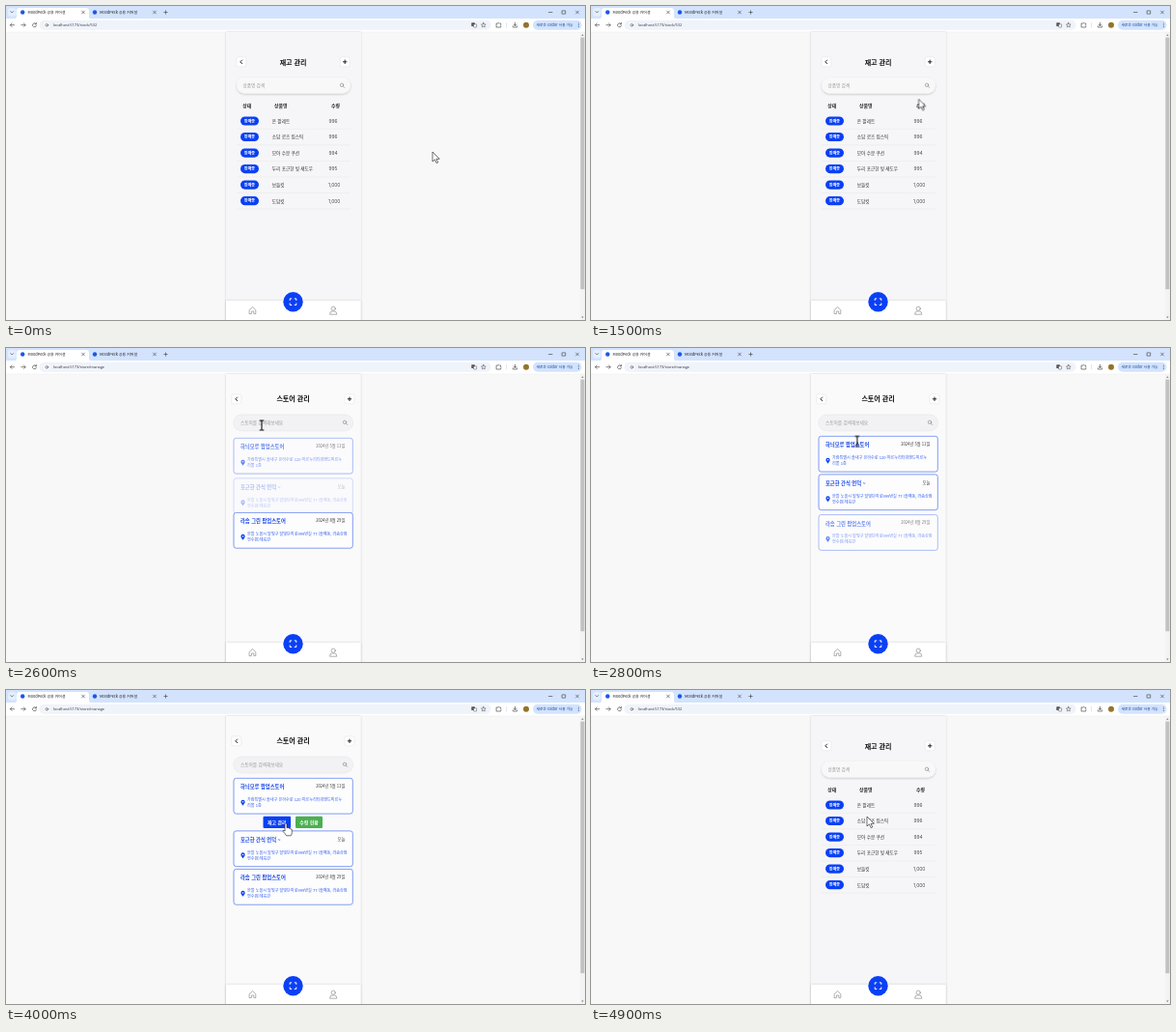
Animation of 600x325 px, one loop 5 s. Source, as an HTML page:

```html
<!DOCTYPE html>
<html lang="ko">
<head>
<meta charset="utf-8">
<title>재고 관리</title>
<style>
html, body { margin: 0; width: 100%; height: 100%; overflow: hidden; background: #f8f8f8; }
svg { display: block; width: 600px; height: 325px; }
text { font-family: 'Noto Sans CJK KR', 'Noto Sans CJK', 'Noto Sans CJK JP', sans-serif; font-size: 4.65px; fill: #333; }
.latin { font-family: 'Open Sans', 'Noto Sans', sans-serif; font-size: 3.9px; }
.tab { font-size: 3.9px; fill: #1f1f1f; }
.title { font-size: 7px; font-weight: 700; fill: #111; text-anchor: middle; }
.head text { font-size: 4.9px; font-weight: 700; fill: #222; }
.hint { fill: #999; }
.num { font-family: Inter, 'DejaVu Sans', sans-serif; font-size: 4.8px; fill: #444; }
.badge { font-size: 4px; font-weight: 700; fill: #fff; text-anchor: middle; }
.btn { font-size: 4.9px; font-weight: 700; fill: #fff; text-anchor: middle; }
.name { font-size: 5.3px; font-weight: 700; fill: #1746e6; }
.date { font-size: 4.2px; text-anchor: end; }
.addr { font-size: 4.1px; fill: #2f5cf0; }
.line { fill: none; stroke: #444; stroke-width: .65; stroke-linecap: round; stroke-linejoin: round; }
.soft { stroke: #888; }
.rule { stroke: #e6e6e8; stroke-width: .5; }

.stock, .store, .shift, .tools, .cursor, .arrow, .beam, .hand, .card { animation: 5s linear infinite; }
.stock { animation-name: stock; animation-timing-function: step-end; }
.store { animation-name: store; animation-timing-function: step-end; }
.card { animation-name: rise; }
.second { animation-delay: .1s; }
.third { animation-delay: .21s; }
.shift { animation-name: shift; animation-timing-function: steps(2); }
.tools { animation-name: tools; animation-timing-function: steps(2); }
.cursor { animation-name: move; }
.arrow { animation-name: arrow; animation-timing-function: step-end; }
.beam { animation-name: beam; animation-timing-function: step-end; }
.hand { animation-name: hand; animation-timing-function: step-end; }

@keyframes stock { 0%, 88% { visibility: visible; } 48% { visibility: hidden; } }
@keyframes store { 0%, 88% { visibility: hidden; } 48% { visibility: visible; } }
@keyframes rise {
  0%, 47.99% { opacity: 1; transform: translateY(0); }
  48% { opacity: 0; transform: translateY(6px); }
  54%, 100% { opacity: 1; transform: translateY(0); }
}
@keyframes shift { 0%, 58% { transform: translateY(0); } 62%, 100% { transform: translateY(15px); } }
@keyframes tools { 0%, 58% { opacity: 0; } 62%, 100% { opacity: 1; } }
@keyframes move {
  0% { transform: translate(442px, 151px); animation-timing-function: steps(8); }
  16% { transform: translate(426px, 132px); animation-timing-function: steps(4); }
  24% { transform: translate(396px, 118px); animation-timing-function: steps(5); }
  34% { transform: translate(302px, 82px); animation-timing-function: steps(4); }
  42% { transform: translate(252px, 63.5px); animation-timing-function: steps(2); }
  46% { transform: translate(244px, 58px); }
  48% { transform: translate(244px, 58px); animation-timing-function: steps(2); }
  52% { transform: translate(265px, 80px); animation-timing-function: steps(5); }
  62% { transform: translate(292px, 121px); animation-timing-function: steps(5); }
  72%, 88% { transform: translate(290px, 138px); animation-timing-function: steps(5); }
  98%, 100% { transform: translate(286px, 131px); }
}
@keyframes arrow { 0%, 48%, 88% { visibility: visible; } 46%, 52% { visibility: hidden; } }
@keyframes beam { 0%, 68% { visibility: hidden; } 52% { visibility: visible; } }
@keyframes hand { 0%, 48%, 88% { visibility: hidden; } 46%, 68% { visibility: visible; } }
</style>
</head>
<body>
<svg viewBox="0 0 600 325">
  <defs>
    <filter id="shade" x="-10%" y="-30%" width="120%" height="170%">
      <feDropShadow dx="0" dy="1" stdDeviation=".9" flood-color="#000" flood-opacity=".2"/>
    </filter>
    <filter id="edge" x="-5%" y="-5%" width="110%" height="110%">
      <feDropShadow dx="0" dy="0" stdDeviation="1" flood-color="#000" flood-opacity=".18"/>
    </filter>
    <g id="back">
      <rect x="-5" y="-5" width="10" height="10" rx="2" fill="#fff" stroke="#dedee2" stroke-width=".5"/>
      <path class="line" d="M.8-1.8L-1 0L.8 1.8" style="stroke:#111;stroke-width:.9"/>
    </g>
    <g id="add">
      <rect x="-5" y="-5" width="10" height="10" rx="2" fill="#fff" stroke="#dedee2" stroke-width=".5"/>
      <path class="line" d="M-1.8 0H1.8M0-1.8V1.8" style="stroke:#111;stroke-width:.9"/>
    </g>
    <g id="lens"><circle class="line soft" r="1.7"/><path class="line soft" d="M1.3 1.3L2.8 2.8"/></g>
    <g id="row">
      <rect x="243" y="-4.6" width="19" height="9.2" rx="4.6" fill="#0a40f5"/>
      <text class="badge" x="252.5" y="1.5">판매중</text>
      <path class="rule" d="M239 8.3H357"/>
    </g>
    <g id="frame">
      <rect x="236" y="0" width="123.3" height="36.8" rx="2.5" fill="#fdfdfe" stroke="#3f68ec" stroke-width=".65"/>
      <path d="M245.5 28.4C244.4 26.8 243.4 25.7 243.4 24.5A2.1 2.1 0 0 1 247.6 24.5C247.6 25.7 246.6 26.8 245.5 28.4Z" fill="#0a40f5"/>
      <circle cx="245.5" cy="24.5" r=".75" fill="#fff"/>
    </g>
    <path id="close" class="line" d="M-1.4-1.4L1.4 1.4M1.4-1.4L-1.4 1.4"/>
  </defs>

  <!-- browser -->
  <rect width="600" height="325" fill="#f8f8f8"/>
  <rect width="600" height="14" fill="#d3e3fd"/>
  <rect x="2" y="2" width="8.5" height="8.5" rx="2.5" fill="#e4eefe"/>
  <path class="line" d="M4.8 5.6L6.2 7L7.6 5.6"/>
  <path d="M8 13.5Q11 13.5 11 10.5V5Q11 2 14 2H83Q86 2 86 5V10.5Q86 13.5 89 13.5Z" fill="#fff"/>
  <circle cx="17.2" cy="6.5" r="2.2" fill="#1b57e8"/>
  <text class="tab" x="22.5" y="8">MoodPeck 공용 커머셜</text>
  <use href="#close" x="80" y="6.5"/>
  <circle cx="92" cy="6.5" r="2.2" fill="#1b57e8"/>
  <text class="tab" x="97" y="8">MoodPeck 공용 커머셜</text>
  <use href="#close" x="154" y="6.5"/>
  <path class="line" d="M163.8 6.5H167.2M165.5 4.8V8.2M562.5 6.5H566M576.5 4.9H579.7V8.1H576.5Z"/>
  <use href="#close" x="592" y="6.5"/>
  <rect y="13" width="600" height="14" fill="#fff"/>
  <path class="line" d="M8.6 19.7H4.4M6.1 18L4.4 19.7L6.1 21.4M15.9 19.7H20.1M18.4 18L20.1 19.7L18.4 21.4M31 18.4A2 2 0 1 0 31.5 20.2M31.4 17.4V18.8H30"/>
  <rect x="34.5" y="14.8" width="468" height="10" rx="5" fill="#eff3fa"/>
  <circle cx="42.3" cy="19.8" r="2.9" fill="#fff"/>
  <circle class="line" cx="42.3" cy="19.8" r="1.5" style="stroke-width:.5"/>
  <path class="line" d="M42.3 19.6V20.5" style="stroke-width:.5"/>
  <text class="latin stock" x="49" y="21.2">localhost:5173/stock/532</text>
  <text class="latin store" x="49" y="21.2">localhost:5173/store/manage</text>
  <rect x="482.3" y="17.2" width="3.6" height="3.8" rx=".5" fill="#555"/>
  <rect class="line" x="484.6" y="18.8" width="3" height="3.2" rx=".4" style="fill:#fff;stroke-width:.5"/>
  <path class="line" style="stroke-width:.5" d="M494.8 17.3L495.5 18.9L497.2 19.1L495.9 20.2L496.3 21.9L494.8 21L493.3 21.9L493.7 20.2L492.4 19.1L494.1 18.9Z"/>
  <path class="line" d="M508.5 18H510A.8 .8 0 0 1 511.4 18H512.7V19.4A.8 .8 0 0 1 512.7 20.8V22H508.5Z"/>
  <path d="M518.5 17V22.5" stroke="#c7d8f5" stroke-width=".6"/>
  <path class="line" d="M527.5 17.2V20.4M526.1 19.1L527.5 20.5L528.9 19.1M525.4 20.8V22H529.6V20.8"/>
  <circle cx="539" cy="19.7" r="3" fill="#94732b"/>
  <rect x="546" y="14.8" width="50.5" height="10" rx="5" fill="#d3e3fd"/>
  <text x="549.5" y="21.2" style="font-size:3.75px;fill:#0b3f91">새로운 Glidor 사용 가능</text>
  <g fill="#24508f"><circle cx="593.3" cy="18" r=".5"/><circle cx="593.3" cy="19.8" r=".5"/><circle cx="593.3" cy="21.6" r=".5"/></g>
  <path d="M0 27H600" stroke="#e3e5e8" stroke-width=".4"/>

  <!-- app column -->
  <rect x="228" y="27" width="139.5" height="300" fill="#fafafb" filter="url(#edge)"/>
  <rect y="13" x="220" width="160" height="1" fill="#fff" opacity="0"/>

  <g class="stock">
    <rect x="228" y="27.2" width="139.5" height="298" fill="#f6f6f8"/>
    <use href="#back" x="243.8" y="57.8"/>
    <use href="#add" x="351.2" y="57.8"/>
    <text class="title" x="297.5" y="60.5">재고 관리</text>
    <rect x="239" y="74" width="118" height="16.5" rx="8.2" fill="#f8f8f9" filter="url(#shade)"/>
    <text class="hint" x="245.5" y="83.8">상품명 검색</text>
    <use href="#lens" x="348" y="81.8"/>
    <g class="head">
      <text x="245.3" y="105.2">상태</text>
      <text x="278" y="105.2">상품명</text>
      <text x="337" y="105.2">수량</text>
    </g>
    <g transform="translate(0 119)"><use href="#row"/><text x="275.8" y="1.8">온 팔레트</text><text class="num" x="334.5" y="1.8">996</text></g>
    <g transform="translate(0 135.5)"><use href="#row"/><text x="275.8" y="1.8">소담 로즈 립스틱</text><text class="num" x="334.5" y="1.8">996</text></g>
    <g transform="translate(0 152.1)"><use href="#row"/><text x="275.8" y="1.8">모아 수분 쿠션</text><text class="num" x="334.5" y="1.8">994</text></g>
    <g transform="translate(0 168.6)"><use href="#row"/><text x="275.8" y="1.8">두리 포근한 빛 섀도우</text><text class="num" x="334.5" y="1.8">995</text></g>
    <g transform="translate(0 185.1)"><use href="#row"/><text x="275.8" y="1.8">보들킷</text><text class="num" x="334" y="1.8">1,000</text></g>
    <g transform="translate(0 201.7)"><use href="#row"/><text x="275.8" y="1.8">도담킷</text><text class="num" x="334" y="1.8">1,000</text></g>
  </g>

  <g class="store">
    <use href="#back" x="238.8" y="52.8"/>
    <use href="#add" x="356" y="52.8"/>
    <text class="title" x="297.5" y="55.4">스토어 관리</text>
    <rect x="235.7" y="69" width="124" height="16.8" rx="8.4" fill="#f2f2f4" stroke="#e2e2e5" stroke-width=".5"/>
    <text class="hint" x="243" y="79">스토어를 검색해보세요</text>
    <use href="#lens" x="351" y="76.8"/>

    <g transform="translate(0 91.3)"><g class="card">
      <use href="#frame"/>
      <text class="name" x="243" y="11">하늬모루 팝업스토어</text>
      <text class="date" x="351.3" y="9.8">2024년 5월 11일</text>
      <text class="addr" x="250" y="23.8">가람특별시 솔내구 은하수로 120 미르누리타워앤드미르누</text>
      <text class="addr" x="250" y="29.9">리몰 1층</text>
    </g></g>

    <g class="tools">
      <rect x="266.5" y="130.8" width="28.6" height="12.2" rx="1.2" fill="#0a40f5"/>
      <text class="btn" x="280.8" y="138.7">재고 관리</text>
      <rect x="300" y="130.8" width="28" height="12.2" rx="1.2" fill="#4caf50"/>
      <text class="btn" x="314" y="138.7">수령 현황</text>
    </g>

    <g class="shift">
      <g transform="translate(0 130.9)"><g class="card second">
        <use href="#frame"/>
        <text class="name" x="243" y="11">포근한 간식 언덕 ~</text>
        <text class="date" x="351.3" y="9.8">오늘</text>
        <text class="addr" x="250" y="23.8">한들 노을시 달빛구 달빛단지로999번길 77 (솔매동, 라솜상점</text>
        <text class="addr" x="250" y="29.9">연수원)체육관</text>
      </g></g>
      <g transform="translate(0 170.4)"><g class="card third">
        <use href="#frame"/>
        <text class="name" x="243" y="11">라솜 그린 팝업스토어</text>
        <text class="date" x="351.3" y="9.8">2024년 8월 29일</text>
        <text class="addr" x="250" y="23.8">한들 노을시 달빛구 달빛단지로999번길 77 (솔매동, 라솜상점</text>
        <text class="addr" x="250" y="29.9">연수원)체육관</text>
      </g></g>
    </g>
  </g>

  <!-- bottom bar -->
  <rect x="228" y="305" width="139.5" height="22" fill="#fff" filter="url(#edge)"/>
  <path class="line soft" d="M252.4 314.6L255.6 311.6L258.8 314.6V318.6H256.8V316H254.4V318.6H252.4Z"/>
  <circle class="line soft" cx="339.2" cy="313.2" r="2.1"/>
  <path class="line soft" d="M335.6 318.8Q335.6 316 338 316H340.4Q342.8 316 342.8 318.8Z"/>
  <circle cx="297.5" cy="306.2" r="10.2" fill="#0a40f5"/>
  <path d="M294.2 304.9V302.9H296.2M298.8 302.9H300.8V304.9M300.8 307.5V309.5H298.8M296.2 309.5H294.2V307.5" fill="none" stroke="#fff" stroke-width="1"/>

  <!-- scrollbar -->
  <rect x="594.8" y="27.2" width="5.2" height="298" fill="#f3f3f3"/>
  <rect x="595.4" y="32.6" width="4" height="260.6" fill="#c1c1c1"/>
  <path d="M596.2 30.8L597.4 29.2L598.6 30.8ZM596.2 321.4L597.4 323L598.6 321.4Z" fill="#707070"/>

  <g class="cursor">
    <path class="arrow" d="M0 0V10L2.4 7.9L4.1 11.6L5.7 10.9L4 7.3H7.2Z" fill="#fff" stroke="#222" stroke-width=".65" stroke-linejoin="round"/>
    <path class="beam" d="M-2.3-5H-.6L0-4.5L.6-5H2.3M0-4.5V4.5M-2.3 5H-.6L0 4.5L.6 5H2.3" fill="none" stroke="#111" stroke-width="1.1"/>
    <path class="hand" d="M-1 .9Q-1-.1 0-.1T1 .9V4.6Q2.7 4 3 5.1Q4.4 4.6 4.7 5.8Q6.3 5.5 6.3 7V9.6Q6.3 11 5.2 12.8H.6Q-.6 10.8-2.8 8.5Q-3.2 7.1-2 7.2L-1 8.1Z" fill="#fff" stroke="#222" stroke-width=".65" stroke-linejoin="round"/>
  </g>
</svg>
</body>
</html>
```
